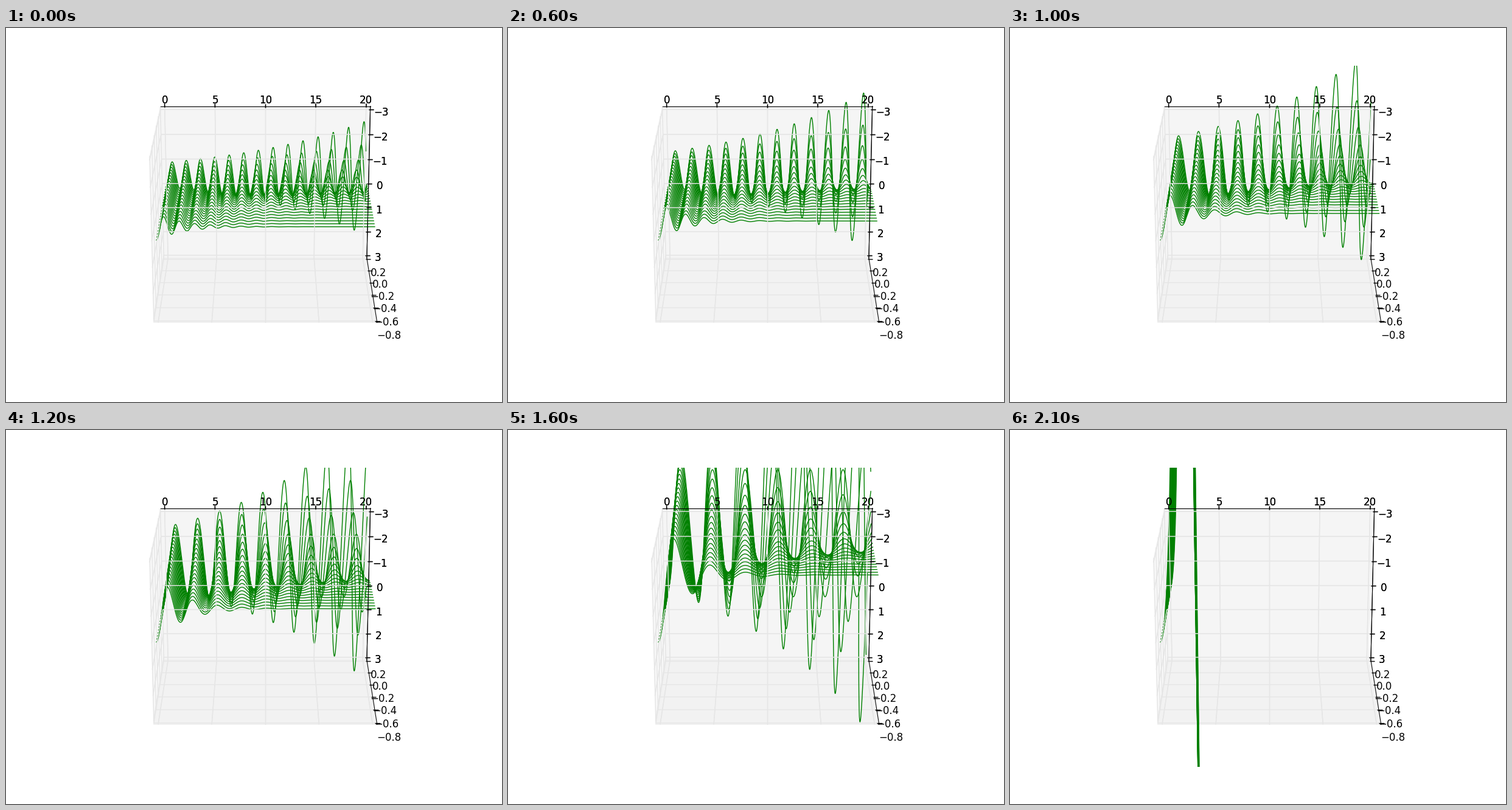
A matplotlib script that plays this animation: 815x615 px, repeating every 2200 ms.

```python
import numpy as np
import matplotlib.pyplot as plt
from matplotlib.animation import FuncAnimation
from matplotlib.collections import LineCollection
from matplotlib.patches import Polygon

plt.rcParams["font.family"] = "DejaVu Sans"

FRAMES = 22
ELEV = np.radians(70)
SIN, COS = np.sin(ELEV), np.cos(ELEV)
DIST = 10
EDGE = 0.5 + 1 / 48      # half size of the padded box
CELL = 1 / 12
LABEL = EDGE + 0.7 * CELL


def project(x, y, z):
    """Perspective view from below; box coordinates are centred on zero."""
    depth = DIST + COS * y + SIN * z
    return x / depth, (COS * z - SIN * y) / depth


def path(*points):
    return np.array([project(*p) for p in points])


def solve(damping, stiffness, steps=2000, end=20.0):
    """Oscillator with one stiffness above rest and another below (RK4)."""
    c = damping[None, :]
    k = stiffness[:, None]
    h = end / steps

    def acc(y, v):
        return c * v - 10 - np.where(y > 0, 13, k) * y

    y = np.zeros((len(stiffness), len(damping)))
    v = np.zeros_like(y)
    out = [y]
    for _ in range(steps):
        v1, a1 = v, acc(y, v)
        v2, a2 = v + h / 2 * a1, acc(y + h / 2 * v1, v + h / 2 * a1)
        v3, a3 = v + h / 2 * a2, acc(y + h / 2 * v2, v + h / 2 * a2)
        v4, a4 = v + h * a3, acc(y + h * v3, v + h * a3)
        y = y + h / 6 * (v1 + 2 * v2 + 2 * v3 + v4)
        v = v + h / 6 * (a1 + 2 * a2 + 2 * a3 + a4)
        out.append(y)
    return np.linspace(0, end, steps + 1)[::2], np.array(out)[::2]


fig = plt.figure(figsize=(8.15, 6.15), dpi=100, facecolor="white")
ax = fig.add_axes([0.125, 0.1, 0.775, 0.8])
ax.set_xlim(-0.095, 0.09)
ax.set_ylim(-0.095, 0.09)
ax.axis("off")


def pane(shade, *corners):
    color = (shade, shade, shade, 0.5)
    ax.add_patch(Polygon(path(*corners), facecolor=color, edgecolor=color,
                         linewidth=1, zorder=0))


def draw_axis(ends, grid, ticks, labels, zorder):
    ax.add_collection(LineCollection(grid, colors=[(0.9, 0.9, 0.9)],
                                     linewidths=1, zorder=zorder),
                      autolim=False)
    ax.plot(*path(*ends).T, color="black", lw=0.75, zorder=zorder + 0.1)
    for tick in ticks:
        ax.plot(*tick.T, color="black", lw=1, solid_capstyle="butt",
                zorder=zorder + 0.2)
    for text, spot in labels:
        ax.annotate(text, project(*spot), xytext=(0, -10.3),
                    textcoords="offset points", ha="center", va="baseline",
                    fontsize=12, color="black", annotation_clip=False,
                    zorder=zorder + 0.3)


def minus(text):
    return text.replace("-", "\u2212")


E = EDGE
OUT, IN = E + 0.2 * CELL, E - 0.1 * CELL

pane(0.95, (-E, -E, -E), (-E, E, -E), (-E, E, E), (-E, -E, E))
pane(0.9, (-E, E, -E), (E, E, -E), (E, E, E), (-E, E, E))
pane(0.925, (-E, -E, E), (E, -E, E), (E, E, E), (-E, E, E))

xs = [(v, v / 20 - 0.5) for v in range(0, 21, 5)]
ys = [(v, v / 6) for v in range(-3, 4)]
zs = [(v / 10, v / 10 + 0.3) for v in range(-8, 3, 2)]

x_axis = (
    [(-E, -E, E), (E, -E, E)],
    [path((p, E, -E), (p, E, E), (p, -E, E)) for _, p in xs],
    [path((p, -OUT, E), (p, -IN, E)) for _, p in xs],
    [(str(v), (p, -LABEL, LABEL)) for v, p in xs],
)
y_axis = (
    [(E, -E, E), (E, E, E)],
    [path((-E, p, -E), (-E, p, E), (E, p, E)) for _, p in ys],
    [path((IN, p, E), (OUT, p, E)) for _, p in ys],
    [(minus(str(v)), (LABEL, p, LABEL)) for v, p in ys],
)
z_axis = (
    [(E, E, -E), (E, E, E)],
    [path((-E, -E, p), (-E, E, p), (E, E, p)) for _, p in zs],
    [path((IN, E, p), (OUT, E, p)) for _, p in zs],
    [(minus(f"{v:.1f}"), (LABEL, LABEL, p)) for v, p in zs],
)

# The x and y axes are painted both behind and over the curves.
draw_axis(*z_axis, zorder=1)
for level in (1, 3):
    draw_axis(*x_axis, zorder=level)
    draw_axis(*y_axis, zorder=level)

damping = -0.8 + 0.05 * np.arange(20)
stiffness = 20.0 - np.arange(FRAMES)
time, waves = solve(damping, stiffness)
curves = [ax.plot([], [], color=(0, 0.5, 0), lw=1, zorder=2)[0]
          for _ in damping]


def update(i):
    for j, curve in enumerate(curves):
        curve.set_data(*project(time / 20 - 0.5, waves[:, i, j] / 6,
                                damping[j] + 0.3))
    return curves


anim = FuncAnimation(fig, update, frames=FRAMES, interval=100,
                     init_func=lambda: update(0), repeat=True,
                     repeat_delay=0, blit=False)
plt.show()
```
